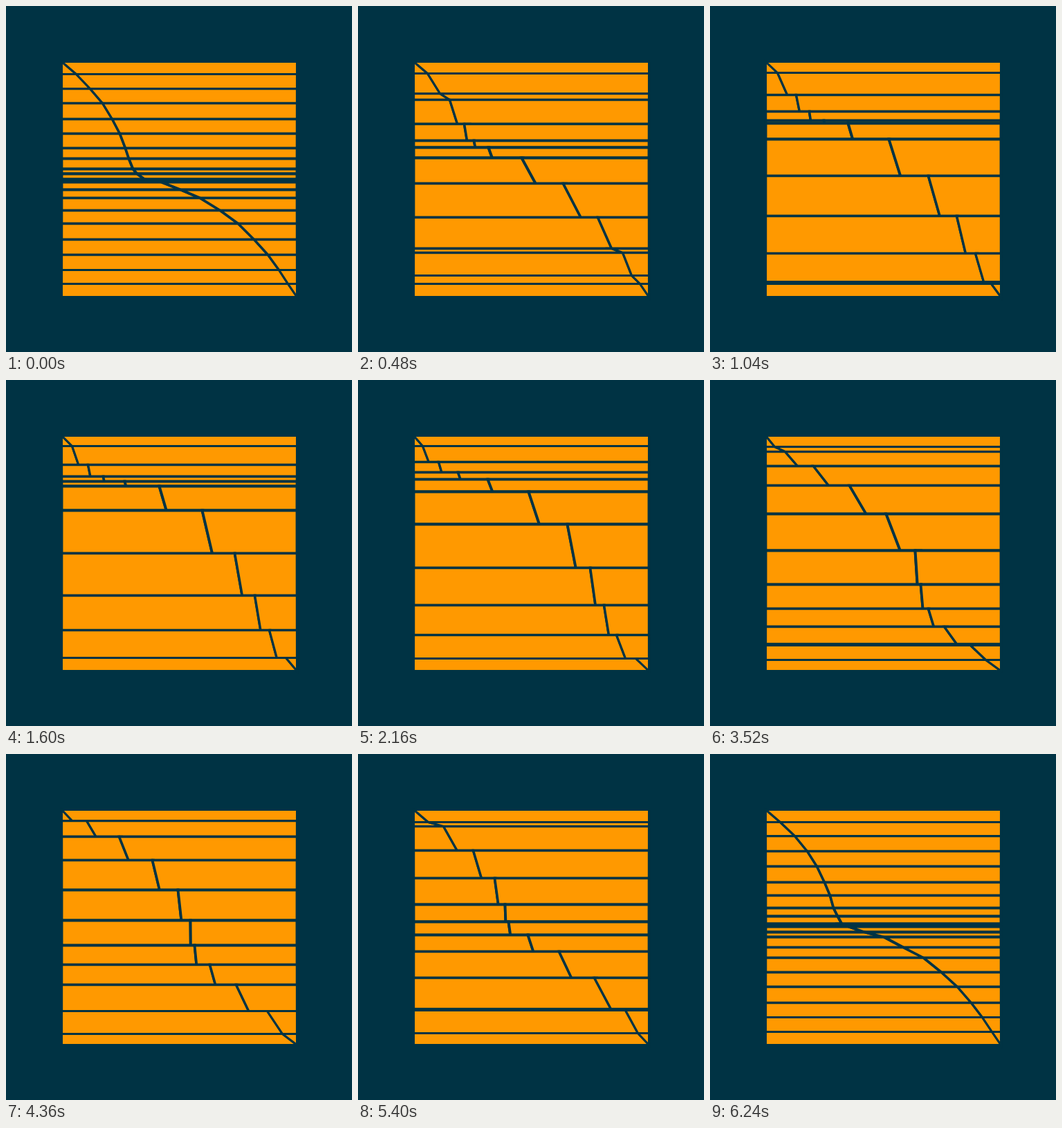
These frames come from a looping animation (500 by 500 pixels, 6.28 s). An HTML page with a canvas:

```html
<!DOCTYPE html>
<html>
<head>
<meta charset="utf-8">
<style>
html, body { margin: 0; height: 100%; overflow: hidden; background: #034; }
canvas { display: block; }
</style>
</head>
<body>
<canvas id="stage" width="500" height="500"></canvas>
<script>
const ctx = document.getElementById('stage').getContext('2d');
const COUNT = 20, LEFT = 80, RIGHT = 420, STEP = 40, LOOP = 6280;

// 0 at both ends of the diagonal, 1 in the middle.
const reach = i => 1 - Math.abs(2 * i / COUNT - 1);

// A point of the diagonal, circling its rest place; even and odd points also bob in opposite directions.
// Whole pixels keep the lines crisp.
function point(i, t) {
  const rest = LEFT + (RIGHT - LEFT) * i / COUNT;
  const angle = 2 * Math.PI * i / COUNT + t;
  const bob = (i % 2 ? -50 : 50) * Math.sin(t);
  return {
    x: Math.floor(rest + reach(i) * 50 * Math.cos(angle)),
    y: Math.floor(rest + reach(i) * (40 * Math.sin(angle) + bob))
  };
}

function quad(side, a, b) {
  ctx.beginPath();
  ctx.moveTo(side, a.y);
  ctx.lineTo(a.x, a.y);
  ctx.lineTo(b.x, b.y);
  ctx.lineTo(side, b.y);
  ctx.closePath();
  ctx.fill();
  ctx.stroke();
}

function draw(t) {
  ctx.setTransform(1, 0, 0, 1, 0, 0);
  ctx.fillStyle = ctx.strokeStyle = '#034';
  ctx.fillRect(0, 0, 500, 500);
  ctx.translate(0.5, 0.5);
  ctx.fillStyle = '#f90';
  // Lower strips cover the upper ones where they overlap.
  for (let i = 0; i < COUNT; i++) {
    const a = point(i, t), b = point(i + 1, t);
    ctx.lineWidth = 3 + reach(i + 0.5);
    quad(LEFT, a, b);
    quad(RIGHT, a, b);
  }
}

const start = performance.now();
function tick() {
  const ms = (performance.now() - start) % LOOP;
  draw((Math.floor(ms / STEP) + 0.5) * 2 * Math.PI * STEP / LOOP);
  requestAnimationFrame(tick);
}
tick();
</script>
</body>
</html>
```
